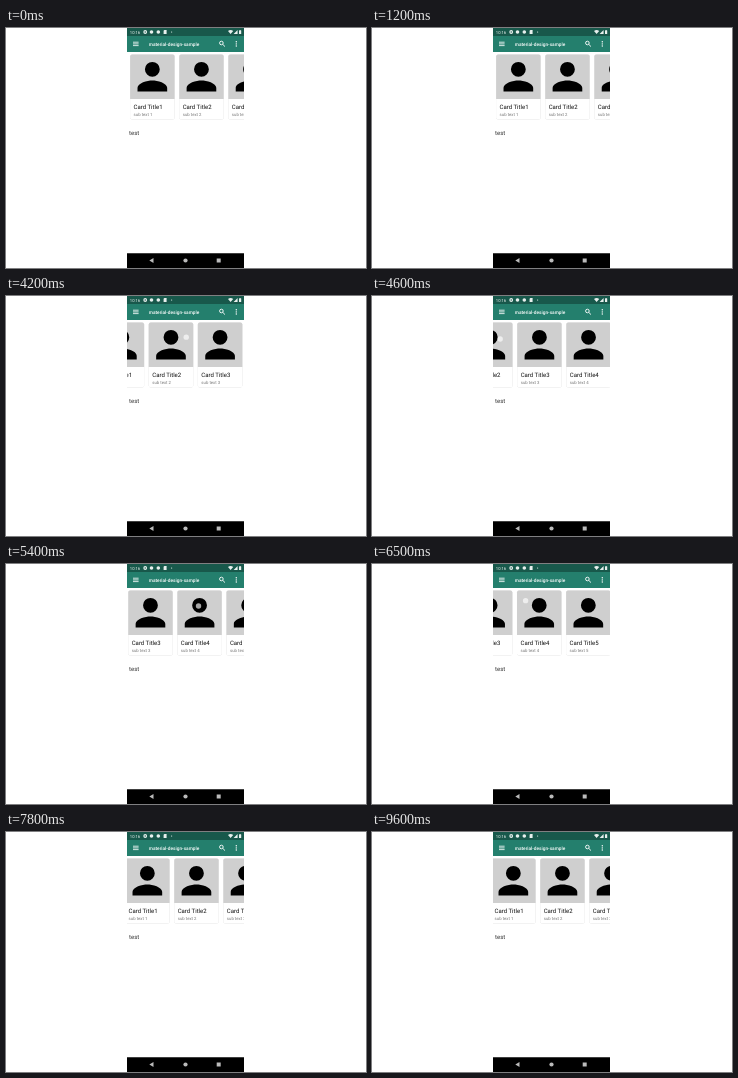
These frames come from a looping animation (360x240 px, 10000 ms). An HTML page:

```html
<!DOCTYPE html>
<html>
<head>
<meta charset="utf-8">
<style>
  html, body { margin: 0; width: 100%; height: 100%; overflow: hidden; background: #fff; }
  svg { display: block; width: 360px; height: 240px; }
  text { font-family: Roboto, sans-serif; text-rendering: geometricPrecision; }
  .card { filter: drop-shadow(0 .4px .5px #0003); }
</style>
</head>
<body>
<svg viewBox="0 0 360 240">
  <defs>
    <clipPath id="screen"><rect x="121" width="117" height="240"/></clipPath>
    <path id="person" d="M12 12a4 4 0 1 0 0-8 4 4 0 0 0 0 8zm0 2c-2.67 0-8 1.34-8 4v2h16v-2c0-2.66-5.33-4-8-4z"/>
  </defs>
  <g clip-path="url(#screen)">
    <g id="cards"></g>
    <text x="123" y="107" font-size="6" fill="#333">test</text>
    <path fill="#247f6d" d="M121 8h117v16H121z"/>
    <path fill="#18584b" d="M121 0h117v8H121z"/>
    <path d="M121 225.3h117V240H121z"/>

    <!-- status bar -->
    <g fill="#e8f0ee">
      <text x="123.8" y="5.6" font-size="4.2">10:16</text>
      <circle cx="139.2" cy="4" r="1.3" fill="none" stroke="#e8f0ee" stroke-width="1.2"/>
      <circle cx="145.5" cy="4" r="1.8"/>
      <circle cx="152.3" cy="4" r="1.8"/>
      <path d="M157.6 2.8l.8-.8h2.2v4h-3z"/>
      <circle cx="165.6" cy="4" r=".6"/>
      <path d="M222 2.9q2.6-2 5.2 0L224.600 6zM231.600 2v4h-4zM233 2.400h.6V2h1v.4h.6V6H233z"/>
    </g>

    <!-- app bar -->
    <path d="M127 14.200h5.600M127 15.900h5.600M127 17.600h5.600" stroke="#fff" stroke-width=".8"/>
    <text x="142.800" y="17.600" font-size="4.75" font-weight="500" fill="#fff">material-design-sample</text>
    <g fill="none" stroke="#fff" stroke-width=".9">
      <circle cx="215.400" cy="15" r="1.800"/>
      <path d="M216.700 16.300l2.300 2.300"/>
    </g>
    <g fill="#fff">
      <circle cx="230.300" cy="13.800" r=".7"/>
      <circle cx="230.300" cy="15.900" r=".7"/>
      <circle cx="230.300" cy="18" r=".7"/>
    </g>

    <!-- navigation bar -->
    <g fill="#bbb">
      <path d="M143.300 232.500l4.200-2.400v4.800zM210.700 230.500h4v4h-4z"/>
      <circle cx="179.500" cy="232.500" r="2.100"/>
    </g>
    <circle id="touch" r="2.700" fill="#fff" fill-opacity=".65"/>
  </g>
</svg>
<script>
const LOOP = 10000;
const cards = document.getElementById('cards');
const touch = document.getElementById('touch');

cards.innerHTML = [1, 2, 3, 4, 5].map(n => `
  <g transform="translate(${75 + 49.1 * n} 26.5)">
    <rect class="card" width="44.5" height="65" rx="2" fill="#fff"/>
    <path d="M0 44.5V2a2 2 0 0 1 2-2h40.500a2 2 0 0 1 2 2v42.500z" fill="#cfcfcf"/>
    <use href="#person" transform="scale(1.854)"/>
    <text x="3.500" y="54" font-size="6" fill="#111">Card Title${n}</text>
    <text x="3.500" y="61.200" font-size="4.300" fill="#777">sub text ${n}</text>
  </g>`).join('');

const clamp = x => Math.min(1, Math.max(0, x));
const smooth = x => x * x * (3 - 2 * x);
const easeOut = x => 1 - (1 - x) ** 2.6;

// Each scroll: start, end, distance, easing
const scrolls = [
  [3900, 4600, 77, smooth],
  [4600, 5050, 22, easeOut],
  [5300, 6200, 31, smooth],
  [6350, 6500, -3.5, x => x * x],
  [6500, 7000, -75, x => x * (0.55 + 0.45 * smooth(x))],
  [7000, 7800, -46.5, easeOut],
];

// Each swipe: start, end, from x, y, to x, y
const swipes = [
  [3900, 4620, 212, 40, 128, 43],
  [5300, 5900, 196, 42, 150, 42],
  [6400, 7020, 149, 37, 214, 32],
];

function draw(now) {
  const t = now % LOOP;
  const offset = scrolls.reduce(
    (sum, [a, b, distance, ease]) => sum + distance * ease(clamp((t - a) / (b - a))), 0);
  cards.setAttribute('transform', `translate(${-offset} 0)`);

  const swipe = swipes.find(([a, b]) => t >= a && t < b);
  touch.setAttribute('visibility', swipe ? 'visible' : 'hidden');
  if (swipe) {
    const [a, b, x0, y0, x1, y1] = swipe;
    const p = smooth((t - a) / (b - a));
    touch.setAttribute('cx', x0 + (x1 - x0) * p);
    touch.setAttribute('cy', y0 + (y1 - y0) * p);
  }
  requestAnimationFrame(() => draw(performance.now()));
}
draw(performance.now());
</script>
</body>
</html>
```
